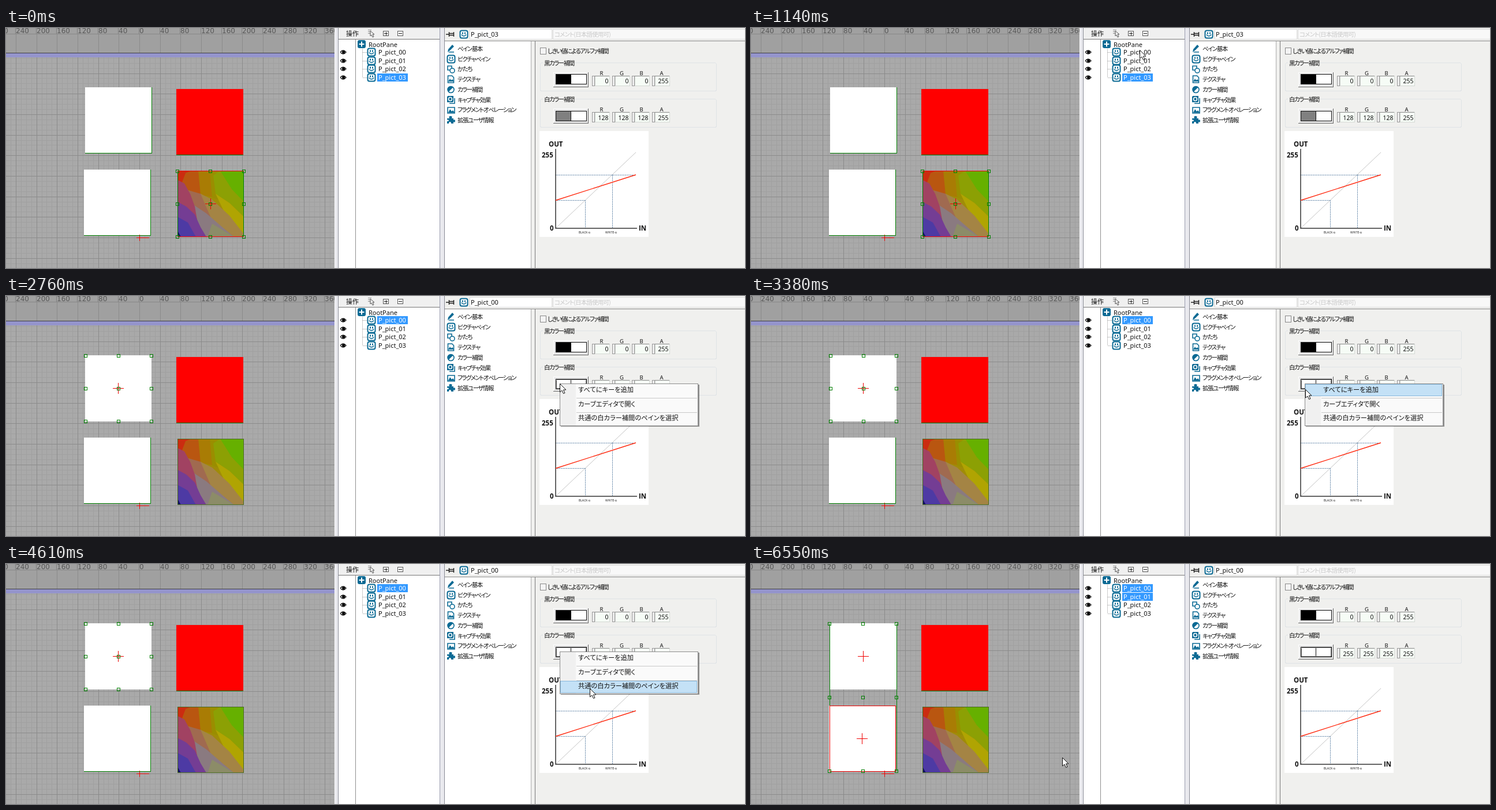
These frames come from a looping animation (1280 by 417 pixels, 6.62 s). An HTML page:

```html
<!DOCTYPE html>
<html lang="ja">
<meta charset="utf-8">
<style>
html, body { margin: 0; width: 100%; height: 100%; overflow: hidden; background: #f0f0f0 }
svg { display: block; width: 1280px; height: 417px }
text { font: 11px "Noto Sans", "Noto Sans CJK JP", sans-serif; fill: #111; white-space: pre }
.jp { font: 10.5px "Noto Sans CJK JP", "Noto Sans CJK", sans-serif; font-feature-settings: "palt"; letter-spacing: -1.5px }
.menu { font: 11.25px "Noto Sans CJK JP", "Noto Sans CJK", sans-serif; font-feature-settings: "palt" }
.ruler { font: 12px "DejaVu Sans", sans-serif; fill: #585858 }
.num { font-size: 10.5px; text-anchor: end }
.rgba { font-size: 9.5px; text-anchor: middle }
.chart { font: bold 11.5px "Open Sans", sans-serif }
.tiny { font: 5px "Open Sans", sans-serif }
rect, .crisp { shape-rendering: crispEdges }
.round { shape-rendering: auto }
</style>
<svg viewBox="0 0 1280 417"><g id="base"></g><g id="state"></g><g id="menu"></g>
<g id="cursor">
  <path d="M.5.5V15L4 12L6.5 17.5L9 16.5L6.5 11H11Z" fill="#fff" stroke="#111"/>
  <g id="badge"><rect x="10.5" y="7.5" width="8" height="9" fill="#fff" stroke="#111" stroke-width="2"/><path d="M12 10.5h5M12 13.5h5" stroke="#111"/></g>
</g></svg>
<script>
const LOOP = 6620, STEP = 76, TEAL = '#0b6a94', GREEN = '#008000', RED = '#f00000';
const $ = id => document.getElementById(id);
const rect = (x, y, w, h, fill, more = '') => `<rect x="${x}" y="${y}" width="${w}" height="${h}" fill="${fill}" ${more}/>`;
const frame = (x, y, w, h, color, fill = 'none', more = '') => rect(x + .5, y + .5, w - 1, h - 1, fill, `stroke="${color}" ${more}`);
const line = (d, color, more = '') => `<path d="${d}" fill="none" stroke="${color}" ${more}/>`;
const fill = (d, color) => `<path d="${d}" fill="${color}"/>`;
const text = (x, y, s, cls = '', more = '') => `<text x="${x}" y="${y}" class="${cls}" ${more}>${s}</text>`;
const hair = (d, color, more = '') => line(d, color, 'class="crisp" ' + more);
const cross = (x, y, r = 9) => hair(`M${x - r} ${y + .5}h${2 * r + 1}M${x + .5} ${y - r}v${2 * r + 1}`, RED);
const handle = (x, y) => frame(x - 3, y - 3, 6, 6, GREEN);
const face = (x, y) => frame(x, y, 14, 14, TEAL, '#fff', 'rx="3" stroke-width="2" class="round"') +
  fill(`M${x + 4} ${y + 3.5}h2v3h-2zM${x + 8} ${y + 3.5}h2v3h-2z`, TEAL) +
  line(`M${x + 3} ${y + 7.5}q4 5 8 0`, TEAL, 'stroke-width="1.5"');
const rowY = i => Math.round(42.3 + i * 14.4);
const fieldX = i => Math.round(1015 + i * 34.6);

function viewport() {
  let s = rect(0, 0, 570, 417, '#a9a9a9') + rect(0, 0, 570, 43, '#a0a0a0');
  const grid = (step, color) => {
    let d = '';
    for (let i = -30; i <= 40; i++) {
      const x = Math.round(231 + i * step);
      if (x >= 0 && x < 569) d += `M${x + .5} 11V417`;
    }
    for (let y = 364 - Math.floor(353 / step) * step; y < 417; y += step) d += `M0 ${Math.round(y) + .5}H569`;
    return hair(d, color);
  };
  s += grid(8.92, '#a0a0a0') + grid(35.68, '#8b8b8b');
  s += rect(0, 43, 569, 1, '#404048') + rect(0, 44, 569, 7, '#9494cc') + rect(0, 10, 569, 1, '#888');
  for (let i = -7; i <= 9; i++) {
    const x = Math.round(231 + i * 35.68);
    s += rect(x - 1, 0, 1, 10, '#808080') + text(x, 8.5, Math.abs(i * 40), 'ruler');
  }
  s += rect(137, 103, 115, 115, '#fff') + rect(295, 106, 116, 115, '#f00') + rect(135, 246, 115, 115, '#fff');
  s += hair('M295 220.5H411', GREEN);
  return s + picture() + cross(231, 364, 5) + rect(231, 364, 17, 1, RED);
}

function picture() {
  const patches = [
    ['0,0 28,0 24,22 10,24 0,18', '#cb2c10'], ['14,4 24,0 39,0 42,42 19,34 8,20', '#b95610'],
    ['36,0 64,0 61,46 40,42', '#a97c04'], ['56,0 82,0 84,54 60,47', '#9a8e00'],
    ['72,0 115,0 115,54 94,35', '#66b000'], ['62,8 74,0 94,32 115,54 115,80 90,56 66,40', '#8ca004'],
    ['66,40 90,56 115,80 115,115 84,78', '#b0a402'],
    ['19,34 40,40 60,52 75,92 50,78 28,64', '#a06a50'], ['40,40 60,50 90,78 115,110 115,115 96,115 58,82', '#a48444'],
    ['26,58 50,74 80,100 98,115 44,115 34,85', '#8a7a80'], ['60,92 98,115 52,115', '#8c8c68'],
    ['0,16 12,22 22,40 30,62 34,85 0,62', '#a14262'], ['0,54 15,62 30,76 40,98 50,115 0,115', '#743d94'],
    ['0,80 18,90 32,115 0,115', '#4d3aa4'], ['0,104 6,115 0,115', '#101060']];
  return `<g transform="translate(297 248)">${rect(0, 0, 115, 115, '#a08c08')}${
    patches.map(([p, c]) => `<polygon points="${p}" fill="${c}"/>`).join('')}</g>`;
}

function tree() {
  let s = rect(569, 0, 190, 417, '#e9e9ee') + rect(569, 0, 1, 417, '#fff') + rect(576, 0, 176, 20, '#f0f0f0');
  s += rect(576, 20, 176, 397, '#fff') + rect(575, 0, 1, 417, '#8a8c96') + rect(576, 19, 176, 1, '#777');
  s += rect(605, 20, 1, 397, '#909090') + rect(751, 0, 1, 417, '#9a9cae');
  s += text(589, 13.5, '操作', 'jp', 'style="font-size:11px;letter-spacing:0"');
  s += line('M627 3.5h6M627 6.5h4M627 9.5h4', '#888') + line('M631 5l7 6h-3l2 4-2 1-2-4-2 2z', '#555');
  for (const x of [653, 678]) s += frame(x, 5, 10, 9, '#555', '#fff') + hair(`M${x + 2} 9.5h6`, '#222');
  s += hair('M658.5 7v6', '#222');
  s += hair('M617.5 36V86' + [0, 1, 2, 3].map(i => `M618 ${rowY(i) + .5}h8`).join(''), '#999', 'stroke-dasharray="1 1"');
  s += rect(609, 21, 14, 14, TEAL, 'rx="3" class="round"') + line('M611.5 28h9M616 23.5v9', '#fff', 'stroke-width="2"');
  s += text(628, 32.5, 'RootPane');
  for (let i = 0; i < 4; i++) {
    const y = rowY(i);
    s += face(626, y - 7) + line(`M579 ${y}q5-6 10 0q-5 6-10 0`, '#111', 'stroke-width="1.3"') +
      `<circle cx="584.5" cy="${y}" r="2.5"/>`;
  }
  return s;
}

function sections() {
  let s = rect(759, 0, 521, 417, '#f0f0ee') + rect(759, 0, 1, 417, '#888a94');
  s += line('M762 11h5M767.5 7v8M775.5 7v8M768 9.5h7M768 12.5h7', '#222', 'stroke-width="1.5"') + face(786, 4);
  s += frame(803, 2, 143, 18, '#dcdcdc', '#fff') + frame(947, 2, 340, 18, '#dcdcdc', '#f8f8f8');
  s += text(950, 15, 'コメント(日本語使用可)', 'jp', 'style="fill:#c9c9c9;letter-spacing:-.8px"');
  s += rect(760, 22, 520, 1, '#888') + rect(760, 23, 149, 394, '#fff') + rect(909, 23, 1, 394, '#aaa') + rect(916, 23, 1, 394, '#777');
  const names = ['ペイン基本', 'ピクチャペイン', 'かたち', 'テクスチャ', 'カラー補間', 'キャプチャ効果', 'フラグメントオペレーション', '拡張ユーザ情報'];
  const thick = 'stroke-width="1.6"';
  const icons = [
    fill('M1 13l1-5 7-8 3 3-7 7zM4 12h8v1.5H2z', TEAL),
    face(0, 0),
    line('M1 1h7v7h-7z', TEAL, thick) + `<circle cx="9" cy="9" r="4" fill="#fff" stroke="${TEAL}" ${thick}/>`,
    line('M1.5 1h7l3 3v9h-10z', TEAL, thick) + fill('M2 11l3-5 2 3 2-2 3 4z', TEAL),
    `<circle cx="6.5" cy="7" r="5.5" fill="#fff" stroke="${TEAL}" ${thick}/>` + fill('M2.5 11A5.5 5.5 0 0 1 10.5 3z', TEAL),
    rect(0, 0, 11, 11, TEAL, 'rx="2"') + `<circle cx="5.5" cy="5.5" r="3" fill="none" stroke="#fff" ${thick}/>` + line('M4 13h9V4', TEAL, thick),
    line('M1 2h12v10h-12z', TEAL, thick) + fill('M2 11l3-6 3 4 2-2 3 4z', TEAL),
    fill('M0 4h4q-2-4 2-4t2 4h3v3q3-2 3 1.5t-3 1.5v3h-4q0-3-2-3t-2 3h-3v-4q3 0 3-1.5t-3-1z', TEAL)];
  names.forEach((name, i) => {
    const y = 36 + i * 17.75;
    s += `<g transform="translate(764 ${Math.round(y - 7)})">${icons[i]}</g>` + text(782, y + 3.8, name, 'jp');
  });
  return s;
}

function colorGroup(y, title) {
  let s = frame(925, y, 306, 50, '#dfe3e6', 'none', 'rx="3"') + rect(930, y - 5, 56, 11, '#f0f0ee') + text(932, y + 4.5, title, 'jp');
  s += rect(948, y + 17, 61, 26, '#666') + rect(948, y + 17, 60, 25, '#fff') + rect(949, y + 18, 59, 24, '#e8e8e8');
  [...'RGBA'].forEach((c, i) => {
    const x = fieldX(i);
    s += text(x + 16.5, y + 21.5, c, 'rgba') + frame(x, y + 23, 5, 18, '#999', '#eee') +
      frame(x + 5, y + 23, 26, 18, '#d4d8d4', '#f6fcf6') + rect(x + 5, y + 23, 25, 1, '#888');
  });
  return s;
}

function chart() {
  const dash = 'stroke-dasharray="2 1"';
  return rect(924, 179, 189, 184, '#fff') +
    line('M952 348L1091 216', '#c4c4c4') +
    hair('M952 299.5H1003.5V348M952 255.5H1091M1050.5 255V348', '#6688aa', dash) +
    line('M952 210V348H1093', '#333', 'stroke-width="1.5"') +
    line('M952 299.5L1091 255', '#ff2a10', 'stroke-width="1.4"') +
    text(940, 206, 'OUT', 'chart') + text(928, 225, '255', 'chart') + text(942, 352, '0', 'chart') + text(1096, 352, 'IN', 'chart') +
    text(992, 357, 'BLACK-α', 'tiny') + text(1038, 357, 'WHITE-α', 'tiny');
}

const swatch = (y, left, focus) => frame(952, y, 54, 18, '#111', '#fff') + rect(953, y + 1, 26, 16, left) + rect(978, y, 1, 18, '#111') +
  (focus ? frame(953, y + 1, 52, 16, '#111', 'none', 'stroke-dasharray="1 1"') : '');
const values = (y, rgb) => [rgb, rgb, rgb, 255].map((v, i) => text(fieldX(i) + 28.5, y, v, 'num')).join('');
const handles = (xs, ys) => ys.map(y => xs.map(x => handle(x, y)).join('')).join('');

// Stages: 0 last pane, 1 first pane, 2 first pane with the swatch focused, 3 both matching panes
function stageView(n) {
  const chosen = [[3], [0], [0], [0, 1]][n];
  let s = '';
  for (let i = 0; i < 4; i++) {
    const y = rowY(i), on = chosen.includes(i);
    if (on) s += rect(643, y - 7, 53, 14, '#3399ff');
    s += text(645, y + 4, 'P_pict_0' + i, '', on ? 'style="fill:#fff"' : '');
  }
  s += text(805, 15, n ? 'P_pict_00' : 'P_pict_03');
  s += swatch(80, '#000') + values(96, 0) + swatch(144, n ? '#fff' : '#808080', n > 1) + values(160, n ? 255 : 128);
  if (n < 3) s += hair('M135 360.5H250.5V246', GREEN);
  if (n == 0) {
    s += hair('M137 217.5H252.5V103', GREEN) + frame(297, 248, 115, 115, GREEN) + hair('M297 248.5h115M297 362.5h115', RED);
    s += cross(354, 305) + handles([297, 354, 412], [249, 306, 363]);
  } else s += frame(297, 248, 115, 115, '#4a6a20');
  if (n == 1) s += frame(137, 103, 116, 115, RED);
  if (n == 1 || n == 2) s += cross(194, 160) + handles([138, 195, 252], [104, 161, 218]);
  if (n == 3) {
    s += hair('M136.5 104V360M252.5 104V360', GREEN) + frame(136, 246, 115, 115, RED);
    s += cross(194, 160) + cross(192, 303) + handles([136, 194, 252], [104, 232, 360]);
  }
  return s;
}

function menuView(hot) {
  let s = rect(961, 154, 240, 73, '#000', 'opacity=".4"') + frame(959, 152, 240, 74, '#8c8c8c', '#fafafa') + rect(960, 153, 27, 72, '#f0f0f0');
  s += rect(988, 177, 209, 1, '#c8c8c8') + rect(988, 202, 209, 1, '#c8c8c8');
  if (hot >= 0) s += frame(960, [153, 178, 203][hot], 237, 21, '#88b8dc', '#c4e1f6');
  return s + ['すべてにキーを追加', 'カーブエディタで開く', '共通の白カラー補間のペインを選択']
    .map((item, i) => text(991, 167 + i * 24.7, item, 'menu')).join('');
}

// Pointer moves: start time, steps, end point
const moves = [[70, 9, 846, 150], [760, 6, 673, 38], [1760, 6, 959, 152], [3380, 1, 960, 162], [3460, 4, 987, 209],
  [3760, 4, 1008, 217], [4070, 1, 1010, 217], [4610, 1, 1011, 216], [6090, 7, 539, 336]];
function pointer(t) {
  let x = 1175, y = 386;
  for (const [start, steps, toX, toY] of moves) {
    if (t < start) break;
    const k = Math.min(1, (Math.floor((t - start) / STEP) + 1) / steps), e = k * k * (3 - 2 * k);
    x += (toX - x) * e;
    y += (toY - y) * e;
  }
  return [Math.round(x), Math.round(y)];
}

const shown = {};
function show(id, key, view) {
  if (shown[id] === key) return;
  shown[id] = key;
  $(id).innerHTML = view(key);
}

$('base').innerHTML = viewport() + tree() + sections() +
  frame(925, 34, 11, 12, '#888', '#f4f4f4') + text(938, 44, 'しきい値によるアルファ補間', 'jp') +
  colorGroup(60, '黒カラー補間') + colorGroup(123, '白カラー補間') + chart();

function draw(now) {
  const t = now % LOOP, [x, y] = pointer(t);
  show('state', [1450, 2530, 5080].filter(at => t >= at).length, stageView);
  const hot = t < 3380 ? -1 : y < 177 ? 0 : y < 202 ? 1 : 2;
  show('menu', t >= 2760 && t < 5000 ? hot : null, key => key === null ? '' : menuView(key));
  $('cursor').setAttribute('transform', `translate(${x} ${y})`);
  $('cursor').style.display = t < 70 ? 'none' : '';
  $('badge').style.display = t > 1760 && t < 2760 && x > 947 && y > 139 ? '' : 'none';
  requestAnimationFrame(draw);
}
draw(0);
</script>
</html>
```
